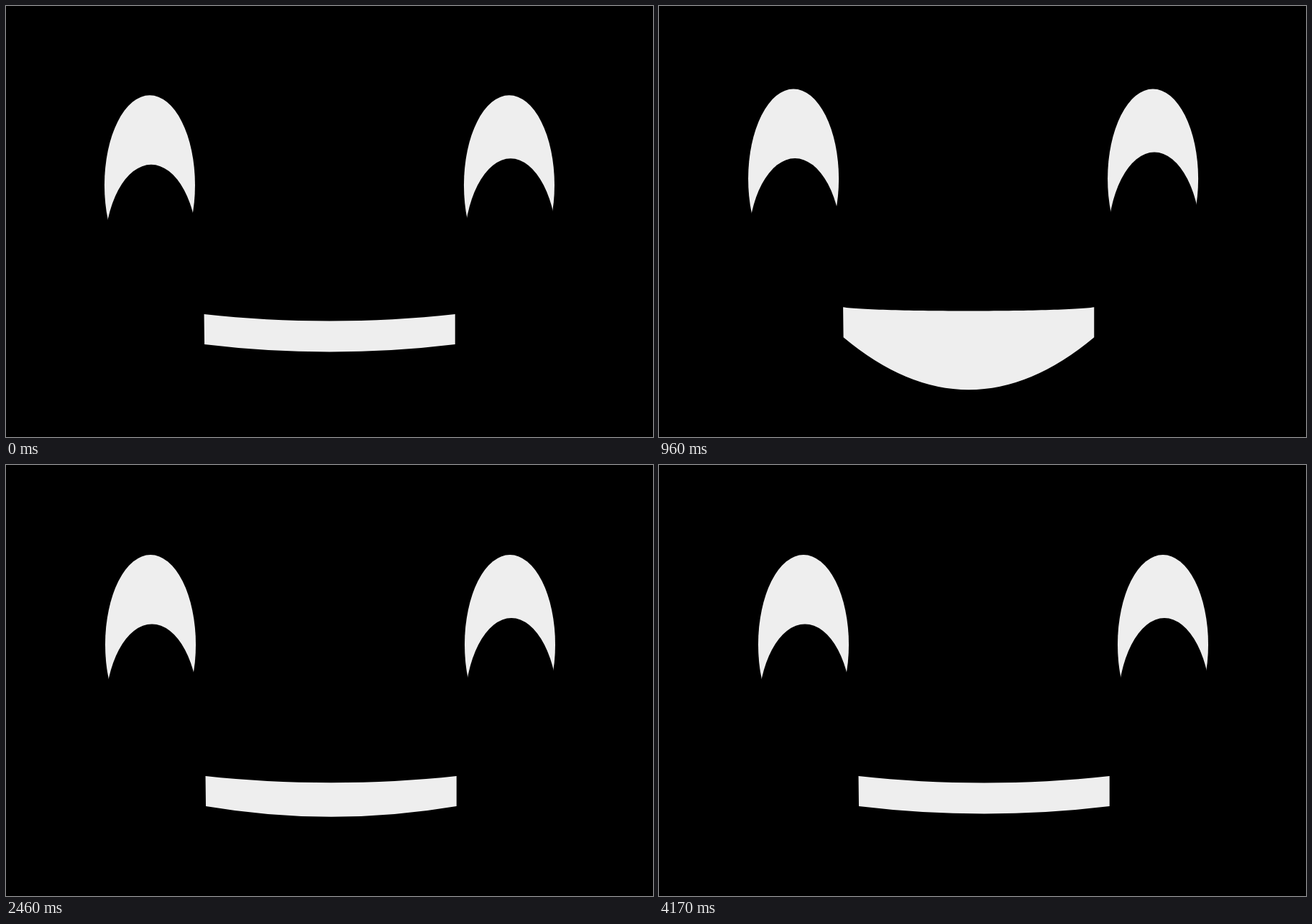
Animation, 900 px wide and 600 px high, one loop 9000 ms. Source, as an HTML page with a canvas:

```html
<!DOCTYPE html>
<html>
<head>
<meta charset="utf-8">
<style>
  html, body { margin: 0; width: 100%; height: 100%; overflow: hidden; background: #000; }
  canvas { display: block; }
</style>
</head>
<body>
<canvas id="stage" width="900" height="600"></canvas>
<script>
const ctx = document.getElementById('stage').getContext('2d');
const LOOP = 9000, STEP = 30, LIGHT = '#eee';

// Each sway runs twice through its corner points at constant pace per side.
const eyeSway = { start: -10, period: 836, points: [[0, 0], [-21.7, -14.7], [11, -22.5], [28, -7.3]] };
const mouthSway = { start: -10, period: 850, points: [[-0.2, -3.2], [-37.8, -22], [23.2, -35.5], [18.2, 0.5]] };

const lerp = (a, b, k) => a + (b - a) * k;
const ramp = (t, from, to) => Math.min(1, Math.max(0, (t - from) / (to - from)));

function sway({ start, period, points }, t) {
  const laps = (t - start) / period;
  if (laps >= 2) return [0, 0];
  const pos = (laps % 1) * points.length;
  const i = Math.floor(pos);
  const a = points[i], b = points[(i + 1) % points.length];
  return [lerp(a[0], b[0], pos - i), lerp(a[1], b[1], pos - i)];
}

function ellipse(color, x, y, rx, ry) {
  ctx.fillStyle = color;
  ctx.beginPath();
  ctx.ellipse(x, y, rx, ry, 0, 0, 2 * Math.PI);
  ctx.fill();
}

function eye(x, cheekX, cheekTop, cheekHeight) {
  ellipse(LIGHT, x, 250, 63, 125);
  ellipse('#000', cheekX, cheekTop + cheekHeight, 65, cheekHeight);
}

function mouth(open) {
  const inset = lerp(116, 45, open);
  const topY = 433 + lerp(12.7, 7, open);
  const bottomY = 475 + lerp(21, 146, open);
  ctx.fillStyle = LIGHT;
  ctx.beginPath();
  ctx.moveTo(277.5, 433);
  ctx.bezierCurveTo(277.5 + inset, topY, 626.7 - inset, topY, 626.7, 433);
  ctx.lineTo(626.7, 475);
  ctx.quadraticCurveTo(452.3, bottomY, 278, 475);
  ctx.fill();
}

function at([x, y], draw) {
  ctx.save();
  ctx.translate(x, y);
  draw();
  ctx.restore();
}

function render(now) {
  const t = Math.floor((now % LOOP) / STEP) * STEP;
  const open = ramp(t, 5, 295) - ramp(t, 1505, 1740)
             + ramp(t, 2440, 2730) - ramp(t, 3940, 4170);
  ctx.fillStyle = '#000';
  ctx.fillRect(0, 0, 900, 600);
  at(sway(eyeSway, t), () => {
    eye(201, 203, 221.5, 122);
    eye(701, 703, 213, 127);
  });
  at(sway(mouthSway, t), () => mouth(open));
}

let begin;
function frame(now) {
  begin ??= now;
  render(now - begin);
  requestAnimationFrame(frame);
}
render(0);
requestAnimationFrame(frame);
</script>
</body>
</html>
```
